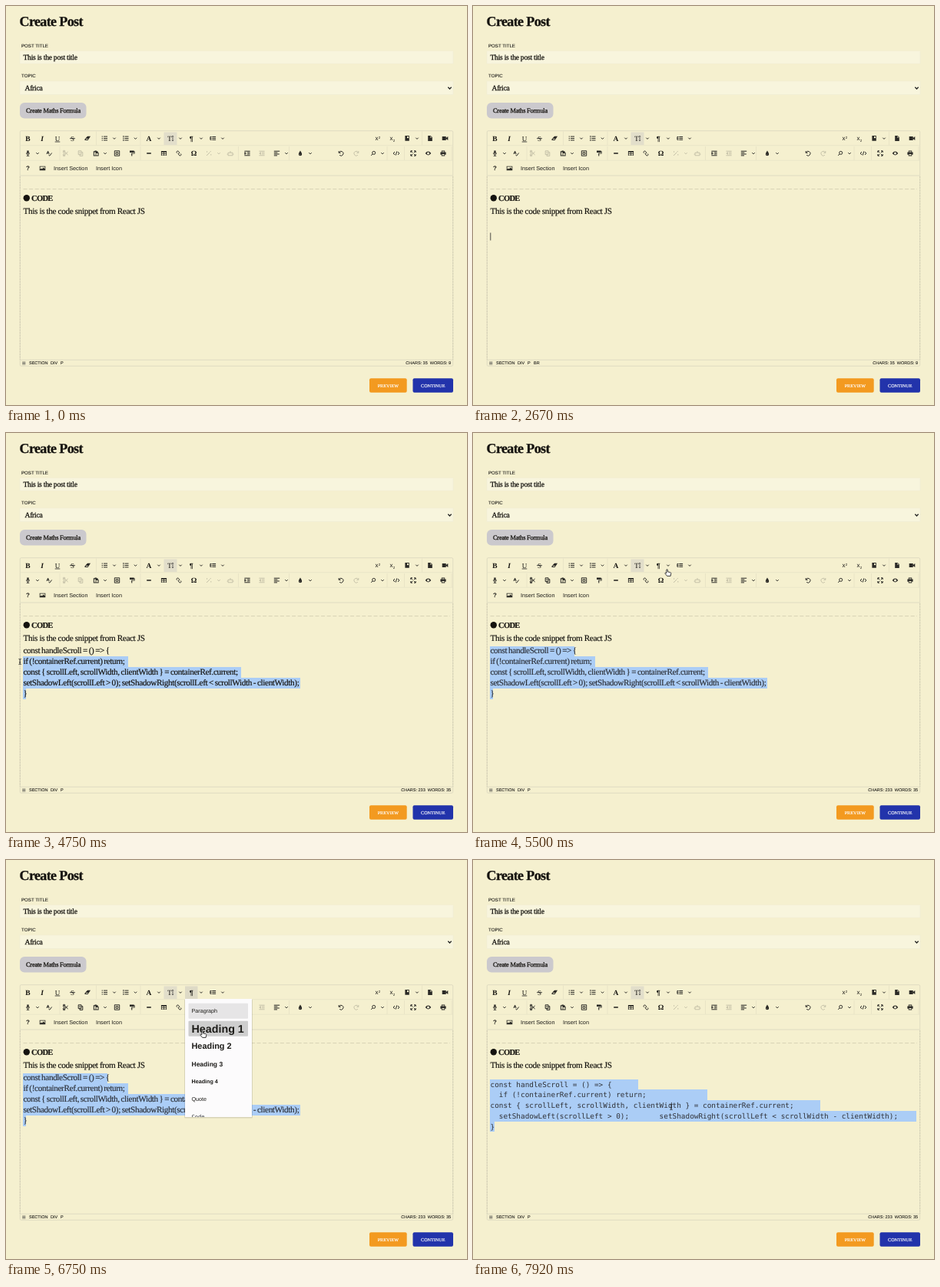
These frames come from a looping animation (600x520 px, 8000 ms). An HTML page:

```html
<!DOCTYPE html>
<html lang="en">
<head>
<meta charset="utf-8">
<title>Create Post</title>
<style>
html, body { margin: 0; width: 100%; height: 100%; overflow: hidden; background: #f5f0cf; }
svg { display: block; width: 600px; height: 520px; }
text { font-family: "Liberation Serif", serif; fill: #15130f; white-space: pre; text-rendering: geometricPrecision; }
.sans { font-family: "Liberation Sans", sans-serif; fill: #1d1c19; }
.label { stroke: #1d1c19; stroke-width: .1; }
.mono { font-family: "DejaVu Sans Mono", monospace; fill: #303238; }
.h1 { font-size: 18px; font-weight: 700; letter-spacing: -.62px; stroke: #15130f; stroke-width: .3; }
.field { font-size: 9.6px; letter-spacing: -.25px; stroke: #15130f; stroke-width: .28; }
.body { font-size: 11.2px; letter-spacing: -.36px; stroke: #15130f; stroke-width: .16; }
.code { word-spacing: -.7px; }
.code.marked { fill: #2c3038; stroke: #2c3038; }
.mid { text-anchor: middle; }
.line { fill: none; stroke: #2b2a26; }
.solid { fill: #2b2a26; fill-rule: evenodd; }
.line.off { stroke: #c5c1a8; }
.solid.off { fill: #c5c1a8; }
</style>
</head>
<body>
<svg viewBox="0 0 600 520">
  <defs><clipPath id="menuClip"><rect x="233" y="181" width="87" height="154"/></clipPath></defs>
  <g id="page"></g>
  <g id="editor"></g>
  <g id="overlay"></g>
</svg>
<script>
const LOOP = 8000, STEP = 250 / 3;
const $ = id => document.getElementById(id);
const esc = s => s.replace(/&/g, '&amp;').replace(/</g, '&lt;');
const text = (x, y, s, cls, size, extra = '') =>
  `<text x="${x}" y="${y}" class="${cls}" ${size ? `font-size="${size}"` : ''} ${extra}>${esc(s)}</text>`;
const rect = (x, y, w, h, fill, extra = '') =>
  `<rect x="${x}" y="${y}" width="${w}" height="${h}" fill="${fill}" ${extra}/>`;
const path = (d, color, extra = '') => `<path d="${d}" fill="none" stroke="${color}" ${extra}/>`;
const icon = (x, y, d, cls = 'line') => `<path class="${cls}" transform="translate(${x} ${y})" d="${d}"/>`;
const chevron = (x, y, cls = 'line') => icon(x, y, 'M-1.7-.8L0 .9 1.7-.8', cls);

const ROW = [172.5, 192, 211.5];
const LINES = 'M-1.5-2.4h5M-1.5 0h5M-1.5 2.4h5';
const INDENT = 'M-3.6-2.8h7.2M0-1h3.6M0 .9h3.6M-3.6 2.8h7.2';
const CUT = 'M-3-3L2.6 2M-3 3L2.6-2M-3.4-2.2a1.1 1.1 0 1 0 2 0a1.1 1.1 0 1 0-2 0M-3.4 2.2a1.1 1.1 0 1 0 2 0a1.1 1.1 0 1 0-2 0';
const COPY = 'M-2.8-3.2h3.8v4.8h-3.8zM1-1.4h1.8v4.8h-3.8v-1.8M-1.5-1.5h1.2M-1.5 0h1.2';

// [x, row, path, class]
const ICONS = [
  [106, 0, 'M-3.8 1.4L0-2.8H4L.6 2.6H-3.2zM-1.6.4L-2.4 1.5H0L1 .4z', 'solid'],
  [128.5, 0, LINES + 'M-3.8-2.4h1.3M-3.8 0h1.3M-3.8 2.4h1.3'],
  [156, 0, LINES + 'M-3.1-3.5v1.9M-3.1-.9v1.8M-3.1 1.6v1.9'],
  [269.5, 0, 'M-1.2-2h4.8M-1.2-.1h4.8M-1.2 1.8h4.8M-3.6-2h1.6M-3.6-.1h1.6M-3.6 1.8h1.6M-3.6-2v3.8'],
  [522, 0, 'M-2.6-3.4H2.8V3.2H-2.6zM0-2.6V0L1-.7 2-.0V-2.6z', 'solid'],
  [552, 0, 'M-2.8-3.6H.6L2.8-1.4V3.6H-2.8zM.3-3V-1H2.3z', 'solid'],
  [571.5, 0, 'M-3.8-2.5H1.2V-.6L3.8-2.4V2.4L1.2.6V2.5H-3.8z', 'solid'],
  [28.5, 1, 'M-1.2-3.6H1.2V.6H-1.2zM-2.4-.8H-1.7Q-1.6 1.5 0 1.5 1.6 1.5 1.7-.8H2.4Q2.3 2.1.5 2.3V3H1.8V3.7H-1.8V3H-.5V2.3Q-2.3 2.1-2.4-.8z', 'solid'],
  [56, 1, 'M-3 1L-1.4-3 .2 1M-2.5-.4h2.2M-.6 2L.8 3.2 3.6-.5'],
  [117, 1, 'M-3.2-2.8H-1.4V-3.6H.8V-2.8H2.6V-1H3.6V3.4H-3.2zM-2.2-1.5H-.4V2.5H-2.2zM.4 0H2.6V2.5H.4z', 'solid'],
  [144.5, 1, 'M-3.2-3.2h6.4v6.4h-6.4zM-1.3-1.3h2.6v2.6h-2.6z'],
  [164, 1, 'M-3-3.5H2.6V-1H-3zM2.6-2.8H3.6V.4H.3V3.6H-.8V-.3H2.8V-2.2H2.6z', 'solid'],
  [186, 1, 'M-2.8-.8H2.8V.8H-2.8z', 'solid'],
  [205.5, 1, 'M-3.6-3.1H3.6V3.1H-3.6zM-2.8-1.2H-.4V.3H-2.8zM.4-1.2H2.8V.3H.4zM-2.8 1.1H-.4V2.4H-2.8zM.4 1.1H2.8V2.4H.4z', 'solid'],
  [225, 1, 'M-2.6-.4L-3-1.5A1.5 1.5 0 0 1-.8-2.8L.6-1.2A1.3 1.3 0 0 1 .2.4M2.6.6L3 1.5A1.5 1.5 0 0 1 .9 2.9L-.6 1.2A1.3 1.3 0 0 1-.2-.4'],
  [264, 1, 'M-3 3L1.4-1.4M-2.4-2.8v1.6M2.8 1v1.6M2.6-3L1.8-2', 'line off'],
  [292, 1, 'M-3-.8H3V2.8H-3zM0-.8V-3M-3.8.6v1.2M3.8.6v1.2M-1.4.8h.2M1.2.8h.2', 'line off'],
  [314, 1, INDENT + 'M-3.2-1.4L-1.4 0-3.2 1.4z'],
  [333, 1, INDENT + 'M-1.4-1.4L-3.2 0-1.4 1.4z', 'line off'],
  [352.5, 1, 'M-3.7-2.8h7.4M-3.7-.9h4.6M-3.7 1h7M-3.7 2.9h4.2'],
  [383, 1, 'M0-3.5Q2.2-.5 2.2 1A2.2 2.2 0 0 1-2.2 1Q-2.2-.5 0-3.5zM-1 1V1.8H.2z', 'solid'],
  [436, 1, 'M-2.8-3v2.4h2.4M-2.6-.8A2.9 2.9 0 1 1-1.8 2.4'],
  [456, 1, 'M2.8-3v2.4h-2.4M2.6-.8A2.9 2.9 0 1 0 1.8 2.4', 'line off'],
  [478, 1, 'M-1.3-.6a2 2 0 1 0 4 0a2 2 0 1 0-4 0M-.8.9L-2.8 2.9'],
  [508, 1, 'M-2-2L-3.8 0-2 2M2-2L3.8 0 2 2M.8-2.6L-.8 2.6'],
  [530, 1, 'M-3.2-1V-3.2H-1M1-3.2H3.2V-1M3.2 1V3.2H1M-1 3.2H-3.2V1M-3-3L-.8-.8M3-3L.8-.8M-3 3L-.8.8M3 3L.8.8'],
  [549.5, 1, 'M-3.8 0Q0-4.8 3.8 0 0 4.8-3.8 0zM-1.6 0A1.6 1.6 0 1 0 1.6 0 1.6 1.6 0 1 0-1.6 0z', 'solid'],
  [569, 1, 'M-2.2-3.4H2.2V-1.6H3.6V1.8H2.2V3.4H-2.2V1.8H-3.6V-1.6H-2.2zM-1.4-2.6H1.4V-1.4H-1.4zM-1.4 1H1.4V2.6H-1.4z', 'solid'],
  [47.5, 2, 'M-3.8-2.8H3.8V2.8H-3.8zM-3-2H3V.8L1.2-1-.6.9-1.6 0-3 1.3z', 'solid'],
];
const CHEVRONS = [[141, 168.5, 199, 227, 254, 282, 535], [41, 129, 365, 396, 490]];
const DIVIDERS = [[117.5, 175, 541.5], [70, 175, 302.5, 368.5, 496, 518.5, 580]];

function drawPage() {
  const edge = '#dad6be', faint = '#e6e1c4';
  const glyph = (x, row, s, size = 9, extra = '') => text(x, ROW[row] + 3.1, s, 'mid', size, extra);
  const bold = 'font-weight="700"';
  const input = (y, h) => rect(18, y, 564, h, '#f8f5dd', 'stroke="#efebd4" stroke-width=".5"');
  let out = rect(0, 0, 600, 520, '#f5f0cf')
    + text(17.5, 25.5, 'Create Post', 'h1')
    + text(20, 53.7, 'POST TITLE', 'sans label', 6.15)
    + input(58.8, 16.2)
    + text(22.5, 69.9, 'This is the post title', 'field')
    + text(20, 92.8, 'TOPIC', 'sans label', 6.15)
    + input(98, 17.5)
    + text(24.5, 109.7, 'Africa', 'field')
    + path('M575.3 105.8l2.2 2.2 2.2-2.2', '#222', 'stroke-width="1.3"')
    + rect(18, 126, 86.5, 20.5, '#cbc9cd', 'rx="6"')
    + text(26, 138.5, 'Create Maths Formula', 'field', 0, 'style="font-size:8.4px;letter-spacing:-.22px"')
    + rect(18.3, 162.7, 563.4, 306.5, 'none', `stroke="${edge}" stroke-width=".8" rx="1.5"`)
    + path('M19 181.7H581M19 201.2H581', faint, 'stroke-width=".7"')
    + path('M19 221H581M19 461.2H581', edge, 'stroke-width=".8"')
    + path('M18.3 222V461M581.7 222V461', '#c9c5ad', 'stroke-width=".7" stroke-dasharray="2 1.5"')
    + rect(205.5, 164.5, 17, 16.5, '#e2deca')
    + path('M22.5 238.6H578', '#d4d0b2', 'stroke-dasharray="5 2.6" stroke-width=".9"');
  DIVIDERS.forEach((xs, r) => xs.forEach(x => out += path(`M${x} ${ROW[r] - 9}V${ROW[r] + 9}`, faint, 'stroke-width=".8"')));
  ICONS.forEach(([x, row, d, cls]) => out += icon(x, ROW[row], d, cls));
  CHEVRONS.forEach((xs, r) => xs.forEach(x => out += chevron(x, ROW[r])));
  out += chevron(277, ROW[1], 'line off');
  out += glyph(28.5, 0, 'B', 9.5, bold) + glyph(47, 0, 'I', 9.5, bold + ' font-style="italic"')
    + glyph(67, 0, 'U', 9) + path('M63.7 177h6.6', '#222', 'stroke-width=".8"')
    + glyph(86.5, 0, 'S', 9) + path('M83 172.6h7', '#222', 'stroke-width=".8"')
    + glyph(186, 0, 'A', 9.5, bold) + glyph(213, 0, 'T', 9.5)
    + path('M217 169.5v6M216 170.3l1-1.2 1 1.2M216 174.8l1 1.2 1-1.2', '#333', 'stroke-width=".7"')
    + text(482.5, 175.3, 'x', 'sans mid', 8) + text(486, 172.5, '2', 'sans mid', 4.5)
    + text(501.5, 174.8, 'x', 'sans mid', 8) + text(505, 176.8, '2', 'sans mid', 4.5)
    + glyph(244.5, 1, 'Ω', 9.5, bold)
    + text(28.5, 214.3, '?', 'sans mid', 8, bold)
    + text(62, 214.1, 'Insert Section', 'sans', 7.28) + text(117, 214.1, 'Insert Icon', 'sans', 7.28)
    + '<circle cx="26.8" cy="250.2" r="4.2" fill="#15130f"/>'
    + text(33, 253.8, 'CODE', 'body', 0, 'style="font-weight:700;font-size:10.6px;letter-spacing:-.75px"')
    + text(22.5, 271.1, 'This is the code snippet from React JS', 'body')
    + path('M21.2 464h4.2M21.2 465.5h4.2M21.2 467h4.2', '#444', 'stroke-width=".7"')
    + text(30, 467.4, 'SECTION', 'sans label', 5.5) + text(58, 467.4, 'DIV', 'sans label', 5.5) + text(71, 467.4, 'P', 'sans label', 5.5);
  [[473, 48.7, '#f39a20', 'PREVIEW'], [529.5, 52.5, '#2233ab', 'CONTINUE']].forEach(([x, w, color, label]) =>
    out += rect(x, 485.2, w, 18.5, color, 'rx="2"')
      + text(x + w / 2, 496.5, label, 'mid', 6.15, 'style="fill:#fff;stroke:#fff;stroke-width:.18"'));
  $('page').innerHTML = out;
}

// Code lines with the right edge of each selection, before and after formatting
const SERIF = [
  ['const handleScroll = () => {', 132], ['if (!containerRef.current) return;', 159],
  ['const { scrollLeft, scrollWidth, clientWidth } = containerRef.current;', 306],
  ['setShadowLeft(scrollLeft > 0); setShadowRight(scrollLeft < scrollWidth - clientWidth);', 382.5], ['}', 26]];
const MONO = [
  ['const handleScroll = () => {', 215], ['  if (!containerRef.current) return;', 305],
  [SERIF[2][0], 452], ['  setShadowLeft(scrollLeft > 0);       setShadowRight(scrollLeft < scrollWidth - clientWidth);', 577], ['}', 28]];

const TIMES = { tipOn: 660, type: 1920, newLine: 2330, paste: 3000, mouseBack: 3500,
  drag: 4250, release: 5080, menu: 6000, format: 7570 };
// [time, x, y]
const POINTER = [
  [330, 60, 150], [580, 28, 213], [750, 28, 213], [1170, 67, 284], [3500, 67, 284], [4000, 53, 341], [4100, 53, 341],
  [4250, 30, 341], [5000, 14, 283], [5080, 11, 282], [5420, 254, 182], [6050, 254, 182], [6550, 257, 227],
  [6850, 257, 227], [7350, 258, 322], [LOOP, 258, 322]];
const HAND = 'M-1.8-4.3c.8 0 1.2.4 1.2 1.1v2.1l3.3.7c.9.3 1.2.8 1 1.6l-.6 3.2h-4.5l-2.5-3.1c-.4-.8.4-1.5 1.2-.9l.5.5v-4c0-.8.1-1.2.4-1.2z';
const BEAM = 'M-1.6-3.6Q0-3.6 0-2.6V2.6Q0 3.6-1.6 3.6M1.6-3.6Q0-3.6 0-2.6M0 2.6Q0 3.6 1.6 3.6M-1 .9h2';

const clamp = (v, a, b) => Math.min(b, Math.max(a, v));
const ease = p => p * p * (3 - 2 * p);

function pointerAt(t) {
  const i = Math.max(1, POINTER.findIndex(k => k[0] >= t));
  const [t0, x0, y0] = POINTER[i - 1], [t1, x1, y1] = POINTER[i];
  const p = ease(clamp((t - t0) / (t1 - t0), 0, 1));
  return [x0 + (x1 - x0) * p, y0 + (y1 - y0) * p];
}

function codeBlock(t, [px, py]) {
  const mono = t >= TIMES.format;
  const lines = mono ? MONO : SERIF;
  const top = mono ? 285.6 : 277.5, height = mono ? 13.75 : 13.9;
  const current = t >= TIMES.release ? -1 : Math.floor((py - top) / height);
  const serif = t >= TIMES.release ? 'body code marked' : 'body code';
  let marks = '', words = '';
  lines.forEach(([s, right], i) => {
    const y = top + i * height;
    if (t >= TIMES.drag && i >= current) {
      const left = i === current ? clamp(px, 22.3, right) : 22.3;
      marks += rect(left, y, right - left, height, '#abcdf6', 'shape-rendering="crispEdges"');
    }
    words += mono ? text(22.5, y + 10, s, 'mono', 9.385) : text(22.5, y + 9.6, s, serif);
  });
  return marks + words;
}

function caret(t) {
  if (t >= TIMES.drag || Math.floor((t + 80) / 500) % 2 === 0) return '';
  const [x, y] = t < TIMES.type ? [180.5, 268] : t < TIMES.newLine ? [22.8, 284] : t < TIMES.paste ? [22.8, 300.5] : [26.5, 340];
  return path(`M${x} ${y - 5}v10`, '#222', 'stroke-width=".8"');
}

const ITEMS = [['Paragraph', 7.2], ['Heading 1', 14.3], ['Heading 2', 10.9], ['Heading 3', 8.5], ['Heading 4', 7.2], ['Quote', 7.2], ['Code', 7.1]];
function menu(t, py) {
  const scroll = 12 * ease(clamp((t - 7050) / 300, 0, 1));
  const hover = py > 185 ? Math.floor((py - 185 + scroll) / 23) : -1;
  let rows = '';
  ITEMS.forEach(([s, size], i) => {
    const y = 196.5 + 23 * i - scroll;
    if (i === 0 || i === hover) rows += rect(237.5, y - 9.7, 77.5, 20, i === hover ? '#cecece' : '#e6e5e6', 'rx="1"');
    rows += text(241.5, y + size * .36, s, i === 6 ? 'mono' : 'sans', size, i > 0 && i < 5 ? 'font-weight="700"' : '');
  });
  return rect(233, 164.5, 16.5, 16.5, '#dedac6') + text(241.3, 175.6, '¶', 'sans mid', 9, 'font-weight="700"')
    + rect(232, 181.5, 89, 155, '#000', 'opacity=".12" rx="1.5"')
    + rect(233, 181, 87, 154, '#fcfbfc') + `<g clip-path="url(#menuClip)">${rows}</g>`;
}

function render(t) {
  const pos = pointerAt(t), [px, py] = pos;
  const pasted = t >= TIMES.paste, open = t >= TIMES.menu && t < TIMES.format;
  const clip = t >= TIMES.release ? 'line' : 'line off';
  let base = icon(78, ROW[1], CUT, clip) + icon(97, ROW[1], COPY, clip)
    + text(241.3, 175.6, '¶', 'sans mid', 9, 'font-weight="700"')
    + text(579, 467.4, pasted ? 'CHARS: 233  WORDS: 35' : 'CHARS: 35  WORDS: 9', 'sans label', 5.5, 'text-anchor="end"');
  if (t >= TIMES.type && !pasted) base += text(79, 467.4, 'BR', 'sans label', 5.5);
  if (pasted) base += codeBlock(t, pos);
  $('editor').innerHTML = base + caret(t);

  let top = open ? menu(t, py) : '';
  if (t >= TIMES.tipOn && t < TIMES.type)
    top += rect(8, 222, 40.5, 12, '#4b4942', 'rx="1"') + text(28.2, 230.1, 'About Jodit', 'sans mid', 5.5, 'style="fill:#fff" font-weight="700"');
  const shown = t >= 330 && (t < TIMES.type || t >= TIMES.mouseBack);
  if (shown) {
    const hand = open || py < 222;
    top += `<path transform="translate(${px} ${py})" d="${hand ? HAND : BEAM}" fill="${hand ? '#fff' : 'none'}" stroke="#222" stroke-width=".9"/>`;
  }
  $('overlay').innerHTML = top;
}

drawPage();
const start = performance.now();
function tick() {
  const t = (performance.now() - start) % LOOP;
  render(Math.floor(t / STEP) * STEP);
  requestAnimationFrame(tick);
}
tick();
</script>
</body>
</html>
```
